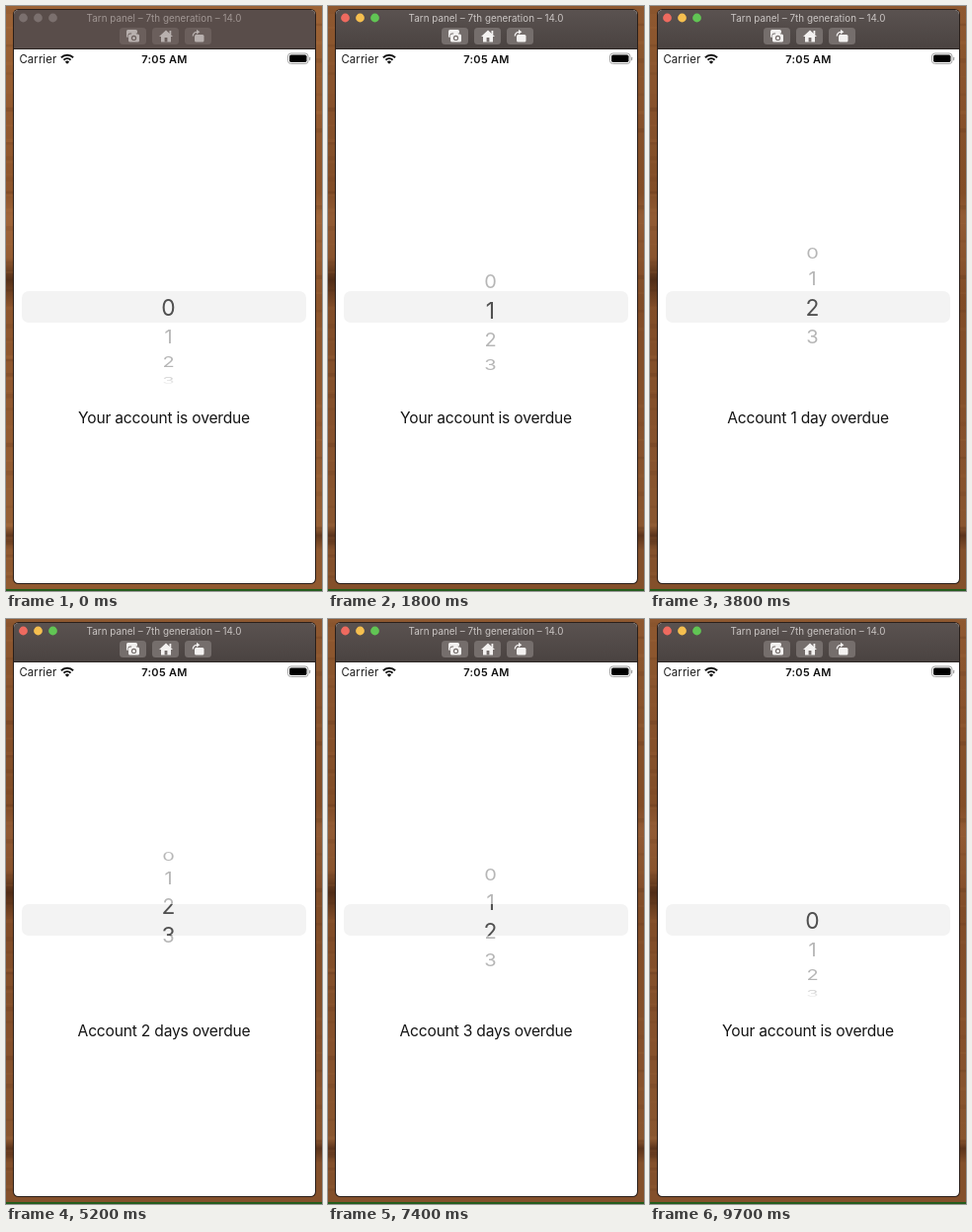
Write an HTML page with a canvas that moves like this. It is 320 px wide and 593 px high and loops after 9.8 s.

```html
<!DOCTYPE html>
<html lang="en">
<head>
<meta charset="utf-8">
<style>
  html, body { margin: 0; width: 100%; height: 100%; overflow: hidden; }
  canvas { display: block; width: 320px; height: 593px; }
</style>
</head>
<body>
<canvas id="stage" width="320" height="593"></canvas>
<script>
const ctx = document.getElementById('stage').getContext('2d');
const LOOP = 9800, STEP = 100;
const CENTER = 305.6, RADIUS = 83, ROW_ANGLE = 0.365;
const BAND = { x: 16, y: 289, w: 288, h: 32 };

// Wheel turns: start, duration, from row, to row
const TURNS = [[1180, 900, 0, 1], [2960, 920, 1, 2], [4900, 920, 2, 3], [7130, 900, 3, 0]];
const LABELS = [
  [8100, 'Your account is overdue'], [5800, 'Account 3 days overdue'],
  [3900, 'Account 2 days overdue'], [2100, 'Account 1 day overdue'],
  [0, 'Your account is overdue']
];

const clamp = v => Math.max(0, Math.min(1, v));

function fillRect(x, y, w, h, color, r = 0) {
  ctx.fillStyle = color;
  ctx.beginPath();
  ctx.roundRect(x, y, w, h, r);
  ctx.fill();
}

function dot(x, y, r, color) {
  ctx.fillStyle = color;
  ctx.beginPath();
  ctx.arc(x, y, r, 0, 7);
  ctx.fill();
}

function polygon(color, ...points) {
  ctx.fillStyle = color;
  ctx.beginPath();
  points.forEach(([x, y]) => ctx.lineTo(x, y));
  ctx.fill();
}

function text(str, x, y, size, color, { align = 'center', weight = 400, spacing = 0 } = {}) {
  ctx.font = `${weight} ${size}px Inter, Roboto, sans-serif`;
  ctx.letterSpacing = spacing + 'px';
  ctx.textAlign = align;
  ctx.fillStyle = color;
  ctx.fillText(str, x, y);
}

function vertical(y0, y1, stops) {
  const g = ctx.createLinearGradient(0, y0, 0, y1);
  stops.forEach(([at, color]) => g.addColorStop(at, color));
  return g;
}

function drawWood(dim) {
  fillRect(0, 0, 320, 593, vertical(0, 593, [
    [0, '#9c6336'], [0.2, '#935a2f'], [0.32, '#8e562c'], [0.36, '#a0663a'], [0.5, '#8c552c'],
    [0.7, '#925a30'], [0.89, '#966035'], [0.905, '#62391e'], [0.93, '#8f5930'], [1, '#915a30']
  ]));
  const clear = 'rgba(70,38,18,0)';
  fillRect(0, 255, 8, 50, vertical(255, 305, [[0, clear], [0.45, 'rgba(70,38,18,.8)'], [1, clear]]));
  for (let i = 0; i < 70; i++) {
    const x = i % 3 ? 0 : 312, y = (i * 67.3) % 588;
    ctx.globalAlpha = 0.05 + (i % 5) * 0.02;
    fillRect(x, y, 8, 1.5 + i % 4, i % 2 ? '#3c1e0c' : '#c48a55');
  }
  ctx.globalAlpha = 0.13 * dim;
  fillRect(0, 0, 320, 593, '#301608');
  ctx.globalAlpha = 1;
  fillRect(0, 591, 320, 2, '#245c1c');
}

function drawToolbar(focused) {
  const ink = focused ? '#f3f1f0' : '#b8b0ae';
  const key = focused ? '#756e6c' : '#6b5f5c';
  const lights = focused ? ['#ee6a5f', '#f5bf4f', '#61c554'] : Array(3).fill('#7b706e');
  lights.forEach((color, i) => dot(17.5 + 15 * i, 12, 4.4, color));
  text('Tarn panel – 7th generation – 14.0', 160, 16, 9.8,
    focused ? '#cbc6c4' : '#a09693', { spacing: 0.04 });
  [115, 148, 181].forEach(x => fillRect(x, 22, 27, 17, key, 3.5));

  // Screenshot
  fillRect(122, 24, 11, 8, ink, 1.5);
  fillRect(123.5, 27.5, 12, 9.5, key, 2);
  fillRect(124, 28.5, 11, 8, ink, 1.5);
  fillRect(127, 27, 5, 3, ink, 1);
  dot(129.5, 32.4, 2.6, key);
  dot(129.5, 32.4, 1.5, ink);

  // Home
  polygon(ink, [155, 31], [162, 24.5], [169, 31], [167, 31], [167, 36.5], [157, 36.5], [157, 31]);
  fillRect(165.5, 25, 1.8, 4, ink);
  fillRect(160.6, 32, 2.8, 4.5, key);

  // Rotate
  fillRect(191, 29, 9.5, 7.5, ink, 1.5);
  ctx.strokeStyle = ink;
  ctx.lineWidth = 1.3;
  ctx.beginPath();
  ctx.arc(193.5, 30.5, 4.2, Math.PI, Math.PI * 1.5);
  ctx.stroke();
  polygon(ink, [193, 23.7], [196.3, 26.2], [193, 28.7]);
}

function drawStatus() {
  text('Carrier', 13.5, 58, 11.3, '#1c1c1c', { align: 'left', spacing: 0.12 });
  text('7:05 AM', 160.5, 58, 11, '#111', { weight: 600, spacing: 0.3 });

  ctx.strokeStyle = '#111';
  ctx.lineWidth = 1.9;
  [5, 8.6].forEach(r => {
    ctx.beginPath();
    ctx.arc(62, 58.3, r, Math.PI * 1.25, Math.PI * 1.75);
    ctx.stroke();
  });
  ctx.fillStyle = '#111';
  ctx.beginPath();
  ctx.moveTo(62, 58.8);
  ctx.arc(62, 58.8, 3, Math.PI * 1.25, Math.PI * 1.75);
  ctx.fill();

  ctx.strokeStyle = '#a3a3a3';
  ctx.lineWidth = 1;
  ctx.beginPath();
  ctx.roundRect(285.5, 48, 20.5, 10.5, 3);
  ctx.stroke();
  fillRect(287, 49.5, 17.5, 7.5, '#000', 1.7);
  fillRect(307, 51.7, 1.2, 3.5, '#a3a3a3', 1);
}

function drawRows(position, size, color) {
  for (let row = 0; row < 4; row++) {
    const angle = (row - position) * ROW_ANGLE;
    if (Math.abs(angle) > 1.4) continue;
    ctx.save();
    ctx.translate(164.5, CENTER + RADIUS * Math.sin(angle));
    ctx.scale(1, Math.cos(angle));
    text(String(row), 0, size * 0.364, size, color);
    ctx.restore();
  }
}

function drawWheel(position) {
  const { x, y, w, h } = BAND;
  drawRows(position, 20, '#b6b6b6');
  const clear = 'rgba(255,255,255,0)';
  fillRect(140, 215, 50, 24, vertical(224, 239, [[0, '#fff'], [1, clear]]));
  fillRect(140, 371, 50, 24, vertical(371, 386, [[0, clear], [1, '#fff']]));

  ctx.save();
  ctx.beginPath();
  ctx.rect(x, y, w, h);
  ctx.clip();
  fillRect(x, y, w, h, '#fff');
  fillRect(x, y, w, h, '#f3f3f3', 7);
  drawRows(position, 22.8, '#505050');
  ctx.restore();
}

function wheelPosition(t) {
  let position = 0;
  for (const [start, duration, from, to] of TURNS) {
    if (t < start) break;
    position = from + (to - from) * Math.sin(clamp((t - start) / duration) * Math.PI / 2);
  }
  return position;
}

function draw(t) {
  const focused = t >= 800;
  drawWood(clamp(t / 600));

  fillRect(7, 3, 307, 583, '#2a1f1a', 5.5);
  fillRect(8, 4, 305, 581, '#fff', 4.5);
  fillRect(8, 4, 305, 39, focused
    ? vertical(4, 43, [[0, '#5a5250'], [1, '#4a4341']])
    : '#594d4a', [4.5, 4.5, 0, 0]);
  fillRect(8, 43, 305, 1, '#2c2624');
  drawToolbar(focused);
  drawStatus();
  drawWheel(wheelPosition(t));

  const label = LABELS.find(([from]) => t >= from)[1];
  text(label, 160, 423.4, 15.6, '#151515', { spacing: -0.2 });
}

function tick() {
  const t = performance.now() % LOOP;
  draw(Math.floor(t / STEP) * STEP);
  requestAnimationFrame(tick);
}
tick();
</script>
</body>
</html>
```
